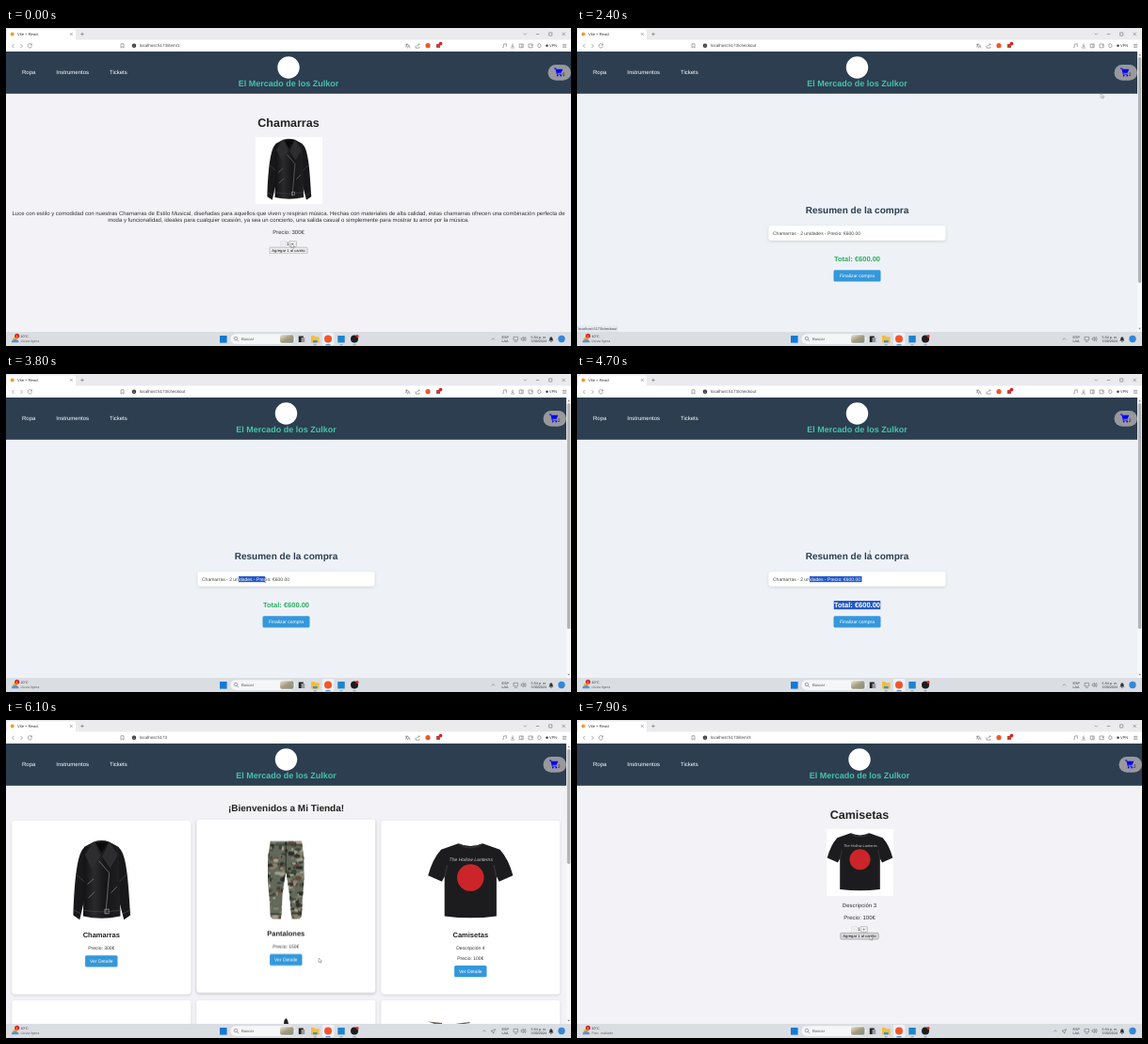
Animation, 600 px wide and 338 px high, one loop 8 s. Source, as an HTML page:

```html
<!DOCTYPE html>
<html lang="es">
<head>
<meta charset="utf-8">
<title>Tienda</title>
<style>
html, body { margin: 0; width: 100%; height: 100%; overflow: hidden; }
svg { display: block; width: 600px; height: 338px; }
text { font-family: "Liberation Sans", Arial, sans-serif; text-rendering: geometricPrecision; white-space: pre; }
.mid { text-anchor: middle; }
.end { text-anchor: end; }
.bold { font-weight: 700; }
.line { fill: none; stroke: #666; stroke-width: .55; }
.card rect.face { filter: drop-shadow(0 1px 1.4px #0002); }
.lift1, .lift2, .sel1, .sel2, #cursor { animation: 8s linear infinite; }
.lift1 { animation-name: lift1; }
.lift2 { animation-name: lift2; }
.sel1 { animation-name: sel1; }
.sel2 { animation-name: sel2; }
#cursor { animation-name: cursor; }
@keyframes lift1 {
  0%, 71% { transform: none; filter: drop-shadow(0 0 0 #0000); }
  74%, 81.5% { transform: translateY(-1.56px); filter: drop-shadow(0 1px 1.5px #0002); }
  84%, 100% { transform: none; filter: drop-shadow(0 0 0 #0000); }
}
@keyframes lift2 {
  0%, 82% { transform: none; filter: drop-shadow(0 0 0 #0000); }
  84.5%, 100% { transform: translateY(-1.56px); filter: drop-shadow(0 1px 1.5px #0002); }
}
@keyframes sel1 {
  0%, 45% { clip-path: inset(0 100% 0 0); }
  50%, 100% { clip-path: inset(0 0 0 0); }
}
@keyframes sel2 {
  0%, 50% { clip-path: inset(0 100% 0 0); }
  52%, 100% { clip-path: inset(0 0 0 0); }
}
@keyframes cursor {
  0%, 3.75% { transform: translate(303px, 229px); }
  7.5%, 16.25% { transform: translate(313px, 235px); }
  17.5% { transform: translate(402px, 203px); }
  21% { transform: translate(555px, 80px); }
  24%, 28.75% { transform: translate(585px, 48px); }
  32.5% { transform: translate(500px, 112px); }
  36.25%, 40% { transform: translate(426px, 160px); }
  45% { transform: translate(247px, 218px); }
  50% { transform: translate(303px, 220px); }
  52.5%, 56.25% { transform: translate(345px, 263px); }
  58.75% { transform: translate(311px, 191px); }
  62.5%, 67% { transform: translate(297px, 52px); }
  72.5% { transform: translate(322px, 228px); }
  76.25%, 80% { transform: translate(332px, 253px); }
  85% { transform: translate(473px, 261px); }
  87%, 91.25% { transform: translate(478px, 263px); }
  95%, 100% { transform: translate(311px, 229px); }
}
</style>
</head>
<body>
<svg viewBox="0 0 600 338">
  <defs>
    <linearGradient id="photo" x2="1" y2="1">
      <stop stop-color="#e8e2d2"/><stop offset=".5" stop-color="#a39c80"/><stop offset="1" stop-color="#7d8f7c"/>
    </linearGradient>
    <linearGradient id="leather" x2="1">
      <stop stop-color="#111113"/><stop offset=".3" stop-color="#2a2a2d"/><stop offset=".6" stop-color="#161618"/><stop offset="1" stop-color="#1f1f22"/>
    </linearGradient>
    <clipPath id="legs"><path d="M32 5H68L71 25 71 50 69 72 68 92 65 95H57L56 88 54 66 50.5 42H49.5L46 66 45 88 44 95H35L32 92 31 72 29 50 29 25Z"/></clipPath>

    <symbol id="jacket" viewBox="0 0 100 100">
      <path fill="#18181a" d="M31 10C22 15 19 48 17.5 89L25 94 34 55ZM69 10C79 15 81 48 83.5 89L76 94 66 55Z"/>
      <path fill="url(#leather)" d="M41 4Q50 1 59 4L70 10 72 90Q50 95 29 90L30 10Z"/>
      <path fill="#0a0a0b" d="M43 5H57L50 17Z"/>
      <path fill="#2d2d30" d="M41 4 49 21 39 35 31 19ZM59 4 51 21 60 35 69 19Z"/>
      <path fill="none" stroke="#85858a" stroke-width=".8" d="M47 26 59 40 55 88M34 53 41 47M61 63 68 56M35 69 42 62"/>
      <path fill="none" stroke="#3f3f43" d="M29 83Q50 87 72 83M21 42 30 50M79 42 71 50M18 83 26 87M83 83 75 87"/>
      <rect x="54" y="82" width="4.5" height="5" fill="none" stroke="#999" stroke-width=".8"/>
    </symbol>
    <symbol id="shirt" viewBox="0 0 100 100">
      <path fill="#1c1c1e" d="M36 6Q50 12 64 6L84 13Q94 24 99 43L83 50 80 44 80 90Q50 94 20 90L20 44 17 50 1 43Q6 24 16 13Z"/>
      <path fill="none" stroke="#333337" stroke-width="1.5" d="M37 7Q50 15 63 7M20.500 44 23 31M79.500 44 77 31"/>
      <text class="mid" x="50.500" y="26.300" font-size="5.500" font-style="italic" fill="#c9c9c9">The Hollow Lanterns</text>
      <circle cx="50" cy="45.500" r="15.500" fill="#cc2529"/>
    </symbol>
    <symbol id="pants" viewBox="0 0 100 100"><g id="camo" clip-path="url(#legs)"></g></symbol>

    <g id="brand">
      <circle cx="300" cy="42" r="11.7" fill="#fff"/>
      <text class="mid bold" x="300" y="62.4" font-size="9" fill="#45c4ac">El Mercado de los Zulkor</text>
    </g>
    <g id="cart">
      <rect x="575.5" y="39" width="24.5" height="16.8" rx="8.4" fill="#98989d"/>
      <path fill="#00f" d="M582 42.5H584L584.5 43.7H591.3L589.6 47.8H585.4L585.7 48.7H590V49.6H584.9L583.4 43.4H582Z"/>
      <circle cx="585.7" cy="50.6" r=".9" fill="#00f"/><circle cx="589.2" cy="50.6" r=".9" fill="#00f"/>
    </g>
  </defs>

  <rect width="600" height="338" fill="#f3f2f6"/>
  <g id="pages"></g>

  <rect y="25" width="600" height="44.8" fill="#2c3e50"/>
  <g font-size="6" fill="#fff">
    <text x="17" y="49.2">Ropa</text><text x="53.3" y="49.2">Instrumentos</text><text x="110" y="49.2">Tickets</text>
  </g>
  <g data-on="0-2300 7100-8000"><use href="#brand"/><use href="#cart"/></g>
  <g data-on="2300-7100"><use href="#brand" x="-2.5"/><use href="#cart" x="-5"/></g>
  <g font-size="5" fill="#222">
    <text x="590.7" y="51" data-on="0-1000">0</text>
    <text x="590.7" y="51" data-on="1000-2300 7100-8000">2</text>
    <text x="585.7" y="51" data-on="2300-7100">2</text>
  </g>
  <g data-on="2300-7100">
    <rect x="595" y="25" width="5" height="298" fill="#f8f8f9"/>
    <path fill="#888" d="M596.2 29.3H599L597.6 27.5ZM596.2 318.7H599L597.6 320.5Z"/>
    <rect x="595.8" y="31" width="3.5" height="240" rx="1.7" fill="#b4b4b6" data-on="2300-5300"/>
    <rect x="595.8" y="31" width="3.5" height="122" rx="1.7" fill="#b4b4b6" data-on="5300-7100"/>
  </g>

  <!-- browser frame -->
  <rect width="600" height="13" fill="#ebebed"/>
  <rect y="12.5" width="600" height="12.5" fill="#fff"/>
  <path fill="#fff" d="M1 13V4Q1 1.5 3.5 1.5H71.5Q74 1.5 74 4V13Z"/>
  <circle cx="6.7" cy="6.5" r="2" fill="#f39a2b"/>
  <text x="12" y="7.9" font-size="4.1" fill="#333">Vite + React</text>
  <path class="line" d="M68 5.2l2.6 2.6m0-2.6-2.6 2.6M79.2 6.5h3.6m-1.8-1.8v3.6M549.8 5.7l1.5 1.5 1.5-1.5M562.8 6.5h3.4M576.6 4.9h3.2v3.2h-3.2zM590.6 4.8l3.3 3.3m0-3.3-3.3 3.3"/>
  <path class="line" d="M8.5 17l-2 2 2 2M15.5 17l2 2-2 2M27 17.4a2.2 2.2 0 1 0 .5 2M27.5 16.5v1.6h-1.6M122 16.8h3v4.4l-1.5-1.2-1.5 1.2z"/>
  <circle cx="136" cy="18.8" r="2.2" fill="#333"/>
  <path stroke="#fff" stroke-width=".6" d="M136 18.4v1.6M136 17.4v.5"/>
  <g font-size="4.5" fill="#444">
    <text x="142" y="20.4" data-on="0-2300">localhost:5173/item/1</text>
    <text x="142" y="20.4" data-on="2300-5300">localhost:5173/checkout</text>
    <text x="142" y="20.4" data-on="5300-7100">localhost:5173</text>
    <text x="142" y="20.4" data-on="7100-8000">localhost:5173/item/3</text>
  </g>
  <path class="line" d="M424 17.4h3.4M425.7 16.5v.9q0 2-1.7 3M424.6 18.5l2 1.7M426.4 21.5l1.4-3.3 1.3 3.3M435 18.5v2.7h4v-1.4M436.4 19.4q.4-2 2.8-2l-1-1m1 1-1 1"/>
  <circle cx="448" cy="18.7" r="2.6" fill="#f1562b"/>
  <rect x="457" y="17" width="4" height="4" fill="#b8463f"/>
  <circle cx="461.5" cy="16.6" r="1.9" fill="#e02020"/>
  <path class="line" d="M527.3 20.6h1v-3.4l3-.5v3.3M538 16.5v3.3l-1.3-1.2m1.3 1.2 1.3-1.2M535.8 21h4.4M545.2 17h4v3.8h-4zM547.8 17v3.8M555 17h4.2v3.8H555zM557.5 18.4h1.7M565 17q2-1 3 1t-2 3q-2-1-1-4M591 17.4h4.2M591 18.9h4.2M591 20.4h4.2"/>
  <circle cx="574.5" cy="18.8" r="1.3" fill="#444"/>
  <text x="577" y="20.3" font-size="4" fill="#333">VPN</text>

  <g font-size="3.8" fill="#444">
    <g data-on="1850-3200"><rect y="316.5" width="44" height="6.5" fill="#e6eaf0"/><text x="1.5" y="321.2">localhost:5173/checkout</text></g>
    <g data-on="5000-5500"><rect y="316.5" width="28" height="6.5" fill="#e6eaf0"/><text x="1.5" y="321.2">localhost:5173</text></g>
    <g data-on="6700-7200"><rect y="316.5" width="40" height="6.5" fill="#e6eaf0"/><text x="1.5" y="321.2">localhost:5173/item/3</text></g>
  </g>

  <!-- taskbar -->
  <rect y="323" width="600" height="15" fill="#dadee3"/>
  <circle cx="9.5" cy="331" r="2.6" fill="#f5b82e"/>
  <path fill="#5a93cf" d="M6 334.2q-.4-2.4 2-2.6 1.6-2 3.4 0 2.4.2 2 2.6z"/>
  <circle cx="11.7" cy="327.3" r="2.5" fill="#d6251f"/>
  <text class="mid" x="11.7" y="328.6" font-size="3.6" fill="#fff">1</text>
  <g font-size="3.7" fill="#333">
    <text x="15.5" y="329">10°C</text>
    <text x="15.5" y="334" fill="#666" data-on="0-7300">Lluvia ligera</text>
    <text x="15.5" y="334" fill="#666" data-on="7300-8000">Parc. nublado</text>
    <text x="526.5" y="329.5">ESP</text><text x="526.5" y="334.3">LAA</text>
    <text class="end" x="574" y="329.5">5:54 p. m.</text><text class="end" x="574" y="334.3">3/30/2024</text>
  </g>
  <rect x="227" y="327" width="7.6" height="7.6" fill="#1479d4"/>
  <rect x="238.5" y="325.3" width="68.5" height="10.6" rx="5.3" fill="#f5f6f8"/>
  <circle class="line" cx="244" cy="330" r="1.8"/><path class="line" d="M245.3 331.4l1.7 1.7"/>
  <text x="250" y="332.1" font-size="4.2" fill="#555">Buscar</text>
  <rect x="291" y="326.3" width="14.5" height="8.4" rx="2" fill="url(#photo)"/>
  <rect x="310.8" y="327.5" width="5" height="6.5" fill="#222"/><rect x="313.5" y="329" width="3.8" height="5" fill="#999"/>
  <path fill="#f4bd3a" d="M324 327h3.4l1 1.2h4.2v6.2H324z"/><path fill="#3c8fd8" d="M326 332h4.6v2.4H326z"/>
  <rect x="335.8" y="324" width="12.6" height="13" rx="1.5" fill="#eef1f4"/>
  <circle cx="342" cy="330.4" r="4" fill="#f1562b"/>
  <rect x="352.3" y="327" width="7.4" height="7.4" fill="#1c84cf"/>
  <circle cx="370" cy="330.6" r="4" fill="#1d1d20"/><circle cx="373" cy="327.4" r="1.5" fill="#e02020"/>
  <path stroke="#7c8891" stroke-width=".8" d="M326.7 336.8h3M354.5 336.8h3M368.5 336.8h3"/><path stroke="#1479d4" d="M339.5 336.8h5"/>
  <path class="line" d="M515.7 331.4l1.7-1.7 1.7 1.7" data-on="0-5300"/>
  <path class="line" d="M506.3 331.4l1.7-1.7 1.7 1.7M515 330.6l4.6-2-2 4.6-.7-2z" data-on="5300-8000"/>
  <path class="line" d="M539 328.4h4.6v3.4H539zM540 333.4h2.6M547 329.6h1l1.4-1.3v4.4l-1.4-1.3h-1zM550.3 329q1 1.5 0 3M551.3 328q1.6 2.5 0 5"/>
  <path fill="#333" d="M576.4 332.6q1-1 .9-2.6.2-1.8 1.6-1.8t1.6 1.8q-.1 1.6.9 2.6zM578 333h1.8l-.9 1z"/>
  <circle cx="590" cy="330.5" r="3.7" fill="#3487d6"/>

  <g id="cursor" fill="#fff" stroke="#555" stroke-width=".4">
    <path d="M0 0V4.7L1.1 3.7 1.9 5.4 2.7 5 1.9 3.4H3.4Z" data-on="0-1380 1520-1820 2350-3540 4130-4600 4820-4950 5350-6750 7100-8000"/>
    <path fill="none" d="M-1-2.6Q0-2.6 0-2 0-2.6 1-2.6M0-2V2M-1 2.6Q0 2.6 0 2 0 2.6 1 2.6" data-on="1380-1520 3540-4130 4600-4820"/>
    <path d="M-.6 0Q0-.7.6 0V1.9L3 2.5V4.6L2.4 5.8H-.6L-2 3.4-1.3 2.8-.6 3.5Z" data-on="1820-2350 4950-5350 6750-7100"/>
  </g>
</svg>
<script>
const LOOP = 8000;
const $ = id => document.getElementById(id);

const text = (x, y, size, str, cls = 'mid', fill = '#333') =>
  `<text x="${x}" y="${y}" font-size="${size}" class="${cls}" fill="${fill}">${str}</text>`;
const rect = (x, y, w, h, fill, more = '') =>
  `<rect x="${x}" y="${y}" width="${w}" height="${h}" fill="${fill}" ${more}/>`;
const image = (id, x, y, size) => `<use href="#${id}" x="${x}" y="${y}" width="${size}" height="${size}"/>`;
const group = (on, ...parts) => `<g data-on="${on}">${parts.join('')}</g>`;
const blueButton = (x, y, w, label) =>
  rect(x - w / 2, y, w, 12.2, '#3498db', 'rx="1.5"') + text(x, y + 7.9, 5, label, 'mid', '#fff');

const edge = 'stroke="#777" stroke-width=".4" rx=".8"';
const faint = 'stroke="#ccc" stroke-width=".4" rx=".8"';

function counter(y, n) {
  const off = n === 1;
  return rect(291.6, y, 6.2, 6.2, '#efefef', off ? faint : edge) +
    text(294.7, y + 4.5, 4.17, '-', 'mid', off ? '#bbb' : '#111') +
    text(299.5, y + 4.9, 5, n) +
    rect(301.2, y, 7.2, 6.2, '#efefef', edge) + text(304.8, y + 4.5, 4.17, '+', 'mid', '#111');
}
const addLabel = (y, n) => text(300, y + 11.4, 4.17, `Agregar ${n} al carrito`, 'mid', '#111');
const addButton = (y, hover) =>
  rect(280, y + 6.9, 40, 6.6, '#efefef', edge) + group(hover, rect(280, y + 6.9, 40, 6.6, '#dcdcdf', edge));

const itemTop = (name, pic) => text(300, 104.5, 12.5, name, 'mid bold', '#222') +
  rect(265, 116, 71, 71, '#fff') + image(pic, 265, 116, 71);

const jacketPage = group('0-2300', itemTop('Chamarras', 'jacket'),
  text(300, 199.2, 6, 'Luce con estilo y comodidad con nuestras Chamarras de Estilo Musical, diseñadas para aquellos que viven y respiran música. Hechas con materiales de alta calidad, estas chamarras ofrecen una combinación perfecta de'),
  text(300, 206.1, 6, 'moda y funcionalidad, ideales para cualquier ocasión, ya sea un concierto, una salida casual o simplemente para mostrar tu amor por la música.'),
  text(300, 218.8, 6, 'Precio: 300€'),
  addButton(226.3, '500-1350'),
  group('0-300', counter(226.3, 1), addLabel(226.3, 1)),
  group('300-2300', counter(226.3, 2), addLabel(226.3, 2)));

const shirtPage = group('7100-8000', itemTop('Camisetas', 'shirt'),
  text(300, 199.2, 6, 'Descripción 3'), text(300, 211.9, 6, 'Precio: 100€'),
  addButton(219.4, '7650-8000'), counter(219.4, 1), addLabel(219.4, 1));

const checkout = group('2300-5300',
  rect(0, 69, 600, 254, '#eef2f7'),
  text(297.5, 196.8, 10, 'Resumen de la compra', 'mid bold', '#2c3e50'),
  `<g class="card">${rect(203.5, 210.3, 188, 15.4, '#fff', 'rx="2" class="face"')}</g>`,
  text(208, 219.9, 5, 'Chamarras - 2 unidades - Precio: €600.00', '', '#444'),
  text(297.5, 248.4, 7.5, 'Total: €600.00', 'mid bold', '#27ae60'),
  blueButton(297.5, 257.3, 50, 'Finalizar compra'),
  `<g class="sel1">${rect(246.9, 215, 55.8, 6.2, '#2458c6')}${text(246.9, 219.9, 5, 'idades - Precio: €600.00', '', '#fff')}</g>`,
  `<g class="sel2">${rect(272.5, 241, 50, 9.4, '#2458c6')}${text(297.5, 248.4, 7.5, 'Total: €600.00', 'mid bold', '#fff')}</g>`);

const cardX = i => 6.3 + 196 * i;
const face = (i, y, h) => rect(cardX(i), y, 190, h, '#fff', 'rx="3" class="face"');

function card(i, pic, name, ...lines) {
  const mid = cardX(i) + 95, last = 244.1 + 10.9 * (lines.length - 1);
  return `<g class="card lift${i}">` + face(i, 107, 184.5) +
    image(pic, mid - 46, 125.7, 92) + text(mid, 231.2, 7.5, name, 'mid bold', '#222') +
    lines.map((l, k) => text(mid, 244.1 + 10.9 * k, 5, l)).join('') +
    blueButton(mid, last + 6.1, 34.4, 'Ver Detalle') + '</g>';
}
const home = group('5300-7100',
  text(297.5, 97.2, 10, '¡Bienvenidos a Mi Tienda!', 'mid bold', '#222'),
  ...[0, 1, 2].map(i => `<g class="card">${face(i, 298, 40)}</g>`),
  '<path fill="#222" d="M295 323l.5-4 2-2 1.500 2 1 4z"/>',
  '<path fill="#6b5f50" d="M448 320.500l15 1.500v1h-8zM477 323l15-2 1 1-6 1z"/>',
  card(0, 'jacket', 'Chamarras', 'Precio: 300€'),
  card(1, 'pants', 'Pantalones', 'Precio: 150€'),
  card(2, 'shirt', 'Camisetas', 'Descripción 4', 'Precio: 100€'));

$('pages').innerHTML = jacketPage + checkout + home + shirtPage;

// camouflage from seeded blobs
let seed = 7;
const rnd = () => (seed = seed * 16807 % 2147483647) / 2147483647;
const tones = ['#3b4436', '#85836f', '#5d4b3c', '#a39d8c', '#2b2d28'];
$('camo').innerHTML = rect(0, 0, 100, 100, '#62685a') + Array.from({ length: 200 }, (_, i) =>
  `<ellipse cx="${27 + rnd() * 46}" cy="${5 + rnd() * 91}" rx="${1 + rnd() * 3}" ry="${.8 + rnd() * 1.8}" fill="${tones[i % 5]}"/>`).join('') +
  '<path fill="none" stroke="#2b2e27" stroke-width="1" d="M32 9H68M50 9V42M31 89H46M55 89H70"/>';

// data-on lists the spans, in ms, when a part is visible
for (const el of document.querySelectorAll('[data-on]')) {
  const spans = el.dataset.on.split(' ').map(s => s.split('-').map(Number));
  const key = (ms, opacity) => ({ offset: ms / LOOP, opacity, easing: 'steps(1, end)' });
  const keys = spans.flatMap(([a, b]) => [key(a, 1), key(b, b === LOOP ? 1 : 0)]);
  if (spans[0][0] > 0) keys.unshift(key(0, 0));
  if (spans.at(-1)[1] < LOOP) keys.push(key(LOOP, 0));
  el.animate(keys, { duration: LOOP, iterations: Infinity });
}
</script>
</body>
</html>
```
